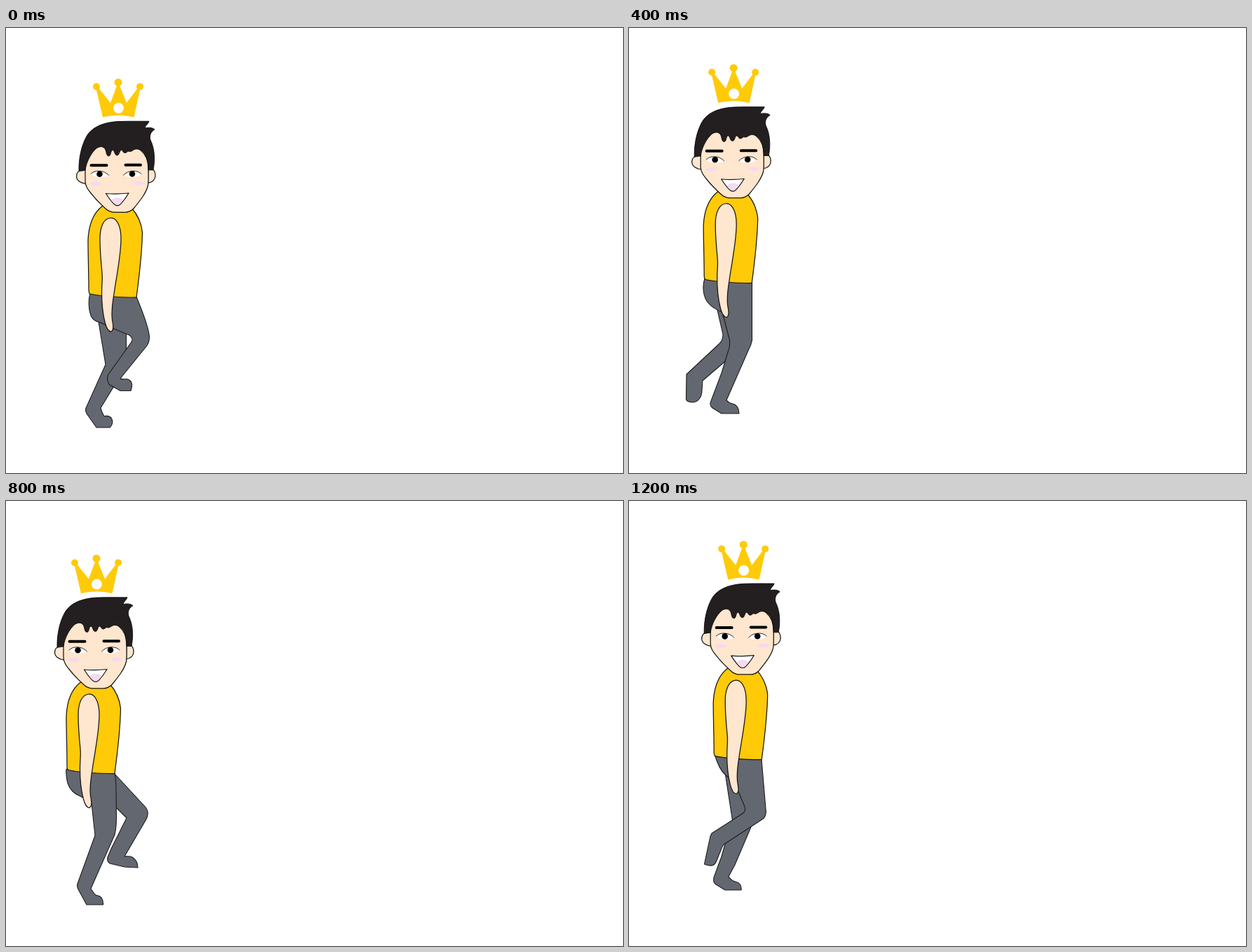
An HTML page that plays this animation: 880x636 px, repeating every 1400 ms.

```html
<!DOCTYPE html>
<html lang="en">
<head>
<meta charset="utf-8">
<title>Walking king</title>
<style>
  html, body { margin: 0; width: 100%; height: 100%; overflow: hidden; background: #fff; }
  svg { display: block; width: 100vw; height: 100vh; }
  path { stroke-linejoin: round; stroke-linecap: round; }
  .pose { visibility: hidden; animation: show 1400ms step-end infinite; animation-delay: calc(var(--i) * 200ms - 1400ms); }
  .pose > path { fill: #636770; stroke: #1c1c1e; stroke-width: 1.1; }
  .line { stroke: #161616; stroke-width: 1.25; }
  .skin { fill: #ffe6ce; }
  .gold { fill: #ffca08; }
  .hair { fill: #231f20; stroke: #000; stroke-width: .8; }
  .brow { fill: none; stroke: #000; stroke-width: 4; }
  .blush { fill: #f6daee; }
  @keyframes show {
    0% { visibility: visible; }
    14.2857%, 100% { visibility: hidden; }
  }
</style>
</head>
<body>
<svg viewBox="0 0 880 636">
  <defs>
    <g id="body">
      <path class="gold line" d="M138 254C126 263 118 280 117 303C117 325 118 350 118 374C118 379 119 379.500 120 380C140 384 165 385 186 385C190 355 194 320 194.500 292C193 278 186 265 179 257Z"/>
      <path class="skin line" d="M149 271.500C158 271 164 283 164 301C164 325 158 352 154 380C151 398 150 410 152 420C153 425 154 432 150 434C146 434 143 428 141 420C138 408 136.500 390 136.500 378C136.500 365 138 360 137 350C135 330 134 312 134 301C134 283 140 272 149 271.500Z"/>

      <!-- head -->
      <path class="skin line" d="M106 203.500C102 205 100.500 209 100.500 212.500C101 218 107 222.500 114.500 222.500V203Z"/>
      <path class="skin line" d="M203 202H209.500C212 204 213 208 213 211.500C212.500 217 208.500 220.500 202.500 221.500Z"/>
      <path class="skin line" d="M113 200V219C113 226 117 231 121 236C128 245 134 251 143 259C147 262.500 150 263.300 155 263.300H170C176 263.300 179 261 182 258C191 247 200 236 202.500 225C203.500 218 203 210 203 200C203 180 190 165 158 165C126 165 113 180 113 200Z"/>
      <path class="hair" d="M104 204.500C103.500 185 108 168 114 156.500C121 143 136 135 160 133.600C175 133 190 133.300 204 133.300C203 137 199 139 198 143C203 142 209 142 212 145C207 148 204 153 206 160C212 172 213 188 210 203L203 203C202.500 192 201 184 197.500 179C194 174 188 172 183.500 173.500C180 175 179 177 176 176.500C173 175 173 178.500 169.500 178.500C166.500 178.500 167 174.500 164.500 174.500C161.500 175 162 182 158.500 182C154.500 182 155 174.500 152 174.500C149 175 150 183 146.500 183C142.500 183 143.500 176 141 172.500C138 168.500 133 169 129 172C122 178 115 190 113 203Z"/>
      <path class="brow" d="M121.500 196.200H143.500M170.500 195.800H192"/>
      <path d="M121 208.500C126 202.500 140 202.500 146.500 210.500C141 214.500 126 214.500 121 208.500Z" fill="#fff"/>
      <path d="M193 208.500C188 202.500 174 202.500 167.500 210.500C173 214.500 188 214.500 193 208.500Z" fill="#fff"/>
      <path d="M121 208.500C126 202.500 140 202.500 146.500 210.500M193 208.500C188 202.500 174 202.500 167.500 210.500" fill="none" stroke="#111" stroke-width=".9"/>
      <circle cx="133.500" cy="208.700" r="4.300"/>
      <circle cx="180" cy="208.500" r="4.300"/>
      <ellipse class="blush" cx="128" cy="222.500" rx="8" ry="3"/>
      <ellipse class="blush" cx="188.500" cy="222" rx="8" ry="3"/>
      <path class="line" fill="#fff" d="M142.500 236.500Q158 238 175 236C172 241 168 247 163 252Q159 255.500 154.500 252C149.500 247.500 146 242 142.500 236.500Z"/>
      <path class="blush" d="M150.500 246.500C153 241 165 241 167 246C164 250 162 253 159 253C156 253 153 250 150.500 246.500Z"/>

      <!-- crown -->
      <path class="gold" d="M128 84L138 127.500Q160 122 182.500 127.500L192 84L188.500 85L172 107L160 77L149 107L131.500 85Z"/>
      <circle class="gold" cx="129" cy="83.700" r="5"/>
      <circle class="gold" cx="160" cy="77.700" r="5.500"/>
      <circle class="gold" cx="191" cy="83.700" r="5"/>
      <circle cx="160.500" cy="114.500" r="7.500" fill="#fff"/>
    </g>
  </defs>

  <!-- each pose: far leg, near leg, upper body -->
  <g class="pose" style="--i:0">
    <path d="M132 420L142 481L115 541C113 544 113 547 115 551L129 571H148C152 567 153 562 150 557C147 554 143 554 140 555C138 552 136 547 135 543L154 512L171.500 464V434Z"/>
    <path d="M120 379C117 390 118 403 121 411C124 418 129 420 135 421L152 429L176 439C181 443 181 446 178 450L146 495C144 499 144 504 147 509C152 513 158 515 163 518.500H178C180 513 181 505 174 502C170 501 166 503 163 501L201 454C205 448 205 443 204 437C200.500 419 193.500 403 186 384Z"/>
    <use href="#body"/>
  </g>
  <g class="pose" style="--i:1">
    <path d="M115 424C111 455 107 475 101 490L90 531L80 544C78 547 78 549 80 553L89 579C92 582 96 583 98 585H110C112 580 111 573 107 570C105 569 103 568 101 568L98 551L108 537C122 505 138 475 151 444L140 425Z"/>
    <path d="M100 392C100 408 105 420 115 427C122 430 130 430 140 430.500C148 437 155 447 162 458C157 480 147 500 142 514L132 530C131 532 132 533 134 533H176C177 527 174 521 170 520C166 520 163 521 160 521L185 457C186 452 186 447 184 442C178 425 174 415 168 397Z"/>
    <use href="#body" x="-18.300" y="13"/>
  </g>
  <g class="pose" style="--i:2">
    <path d="M126 403L134 438C134 445 132 448 129 451L82 495L81.500 531C83 534 87 535 92 535C99 534 104 527 104 518L105 504L140 474L150 440L135 400Z"/>
    <path d="M108 358C104 370 106 385 113 393C117 398 123 402 133 406L143.500 446C144 452 144 456 142 460L132 493L117 533C115 537 116 541 119 543L132 551H157C157 543 153 538 148 537C144 537 142 535 139 532L174 452L175.500 446V364Z"/>
    <use href="#body" x="-10.800" y="-20.500"/>
  </g>
  <g class="pose" style="--i:3">
    <path d="M171 384L191 432C194 440 193 447 189 455L153 489C151 490 151 492 151 494C153 502 151 511 147 515H144L141 510L128 494C125 490 126 486 129 483L150 462L162 451C168 447 168 440 164 438L155 400Z"/>
    <path d="M103 373C101 388 103 400 111 408C116 412 121 413 126 414L130 428L136 470L106 543C105 546 105 549 107 551L120 567H141.500C142 560 139 554 134 554C131 554 130 553 128 551L125 545L158 474L171 379Z"/>
    <use href="#body" x="-15" y="-5.300"/>
  </g>
  <g class="pose" style="--i:4">
    <path d="M155 390L198.500 437C203 442 203 448 200.500 454L169 508C172 508 176 507 180 509C185 512 188 518 188 524L169 523L148 518C145 516 144 513 145 509L150 497L172 453L157 438Z"/>
    <path d="M86 383C85 398 88 408 95 415C100 420 105 421 110 424L122 432L127 478L102 547C101 550 102 553 103 555L115 577H138.500C139 570 136 565 131 564C127 564 125 560 121 554L155 477C157 470 157.500 460 157.500 450L157 415C157 405 157 397 155 389Z"/>
    <use href="#body" x="-31" y="4.500"/>
  </g>
  <g class="pose" style="--i:5">
    <path d="M189 395L194 437L162 521C167 524 173 522 177 525C181 528 183 534 182.500 540H151L142 534C140 530 141 527 143 524L156 477L170 440Z"/>
    <path d="M130 348C126 360 127 375 132 384C136 391 142 393 146 396C149 400 150 403 150 408L150.500 438L109 511C108 514 109 517 110 520L119 552C121 555 126 552 129 548C132 540 132 528 127 516L155 475L178 445L189 396L197 354Z"/>
    <use href="#body" x="11.300" y="-30.500"/>
  </g>
  <g class="pose" style="--i:6">
    <path d="M137 388L149 466L137 490L132 508L121 538C120 543 121 546 124 548L137 556H160C161 549 157 545 152 544C147 544 146 541 142 537L151 520L174 466L160 400Z"/>
    <path d="M122 362C126 375 130 385 137 391C140 394 143 396 147 398L155 413L165 437C166 442 166 443 163 446L118 475L116 479L107.500 519C112 521 117 522 121 520C125 517 127 508 129 504C131 500 132 495 135 491L190 455C195 452 196 445 195 440L189 369Z"/>
    <use href="#body" x="3.200" y="-15.300"/>
  </g>
</svg>
</body>
</html>
```
